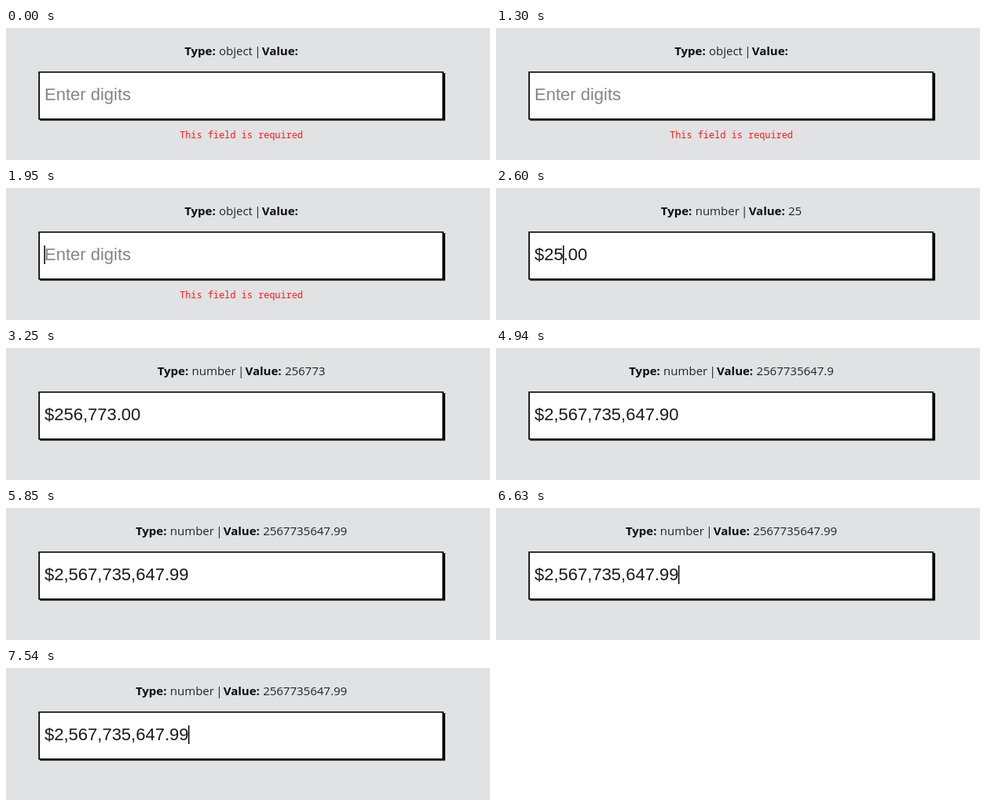
Write an HTML page that moves like this. It is 616 px wide and 170 px high and loops after 7.93 s.

```html
<!DOCTYPE html>
<html lang="en">
<head>
<meta charset="utf-8">
<title>Currency input</title>
<style>
  html, body { margin: 0; width: 100%; height: 100%; overflow: hidden; background: #e1e2e4; }
  svg { display: block; }
  #info { font: 15px "Open Sans", sans-serif; word-spacing: .4px; fill: #222; }
  #info .b { font-weight: 700; fill: #0c0c0c; }
  #field { font: 22px "Liberation Sans", Arial, sans-serif; }
  #error { font: 11.9px "Noto Sans Mono", monospace; fill: #fb1c1c; }
</style>
</head>
<body>
<svg width="616" height="170" viewBox="0 0 616 170">
  <text id="info" x="299.5" y="34.5" text-anchor="middle"><tspan class="b">Type:</tspan> <tspan id="type">object</tspan> <tspan dx="-2">|</tspan> <tspan class="b" dx="-3">Value:</tspan> <tspan id="value"></tspan></text>
  <rect x="43" y="58" width="516" height="61.3"/>
  <rect x="41.3" y="56" width="515.7" height="62"/>
  <rect x="43" y="57.6" width="512.3" height="58.9" fill="#fff"/>
  <text id="field" x="49" y="93.2"></text>
  <rect id="caret" y="74" width="1.5" height="24"/>
  <text id="error" x="299.5" y="141.5" text-anchor="middle">This field is required</text>
</svg>
<script>
const LOOP = 7930, TICK = 130, BLINK = 520;
const FOCUS = 780, WHOLE = 2340, DECIMALS = 4550, DONE = 5330;
const TYPED = '2567735647.99';
const DOT = TYPED.indexOf('.');

const $ = id => document.getElementById(id);
const [type, value, field, caret, error] = ['type', 'value', 'field', 'caret', 'error'].map($);
const money = s => Number(s).toLocaleString('en-US', { style: 'currency', currency: 'USD' });

// Keys pressed since a start time, one every `gap` ms
const keys = (t, start, gap, max) =>
  Math.min(max, Math.max(0, Math.floor((t - start) / gap) + 1));

function caretOn(t) {
  const since = [DONE, WHOLE, FOCUS].find(start => t >= start);
  return since !== undefined && (t - since) % (2 * BLINK) < BLINK;
}

function draw(t) {
  const count = keys(t, WHOLE, 165, DOT) + keys(t, DECIMALS, 390, TYPED.length - DOT);
  const text = TYPED.slice(0, count);
  const label = count ? money(text) : 'Enter digits';
  const caretAt = count && label.indexOf('.') + Math.max(0, count - DOT);

  type.textContent = count ? 'number' : 'object';
  value.textContent = count ? Number(text) : '';
  field.textContent = label;
  field.setAttribute('fill', count ? '#1b1b1f' : '#858585');
  error.style.display = count ? 'none' : '';
  caret.setAttribute('x', 48.4 + (caretAt ? field.getSubStringLength(0, caretAt) : 0));
  caret.style.display = caretOn(t) ? '' : 'none';
}

const start = performance.now();
let drawn = -1;
function frame() {
  const t = (performance.now() - start) % LOOP;
  const tick = Math.floor(t / TICK) * TICK;
  if (tick !== drawn) draw(drawn = tick);
  requestAnimationFrame(frame);
}
frame();
</script>
</body>
</html>
```
